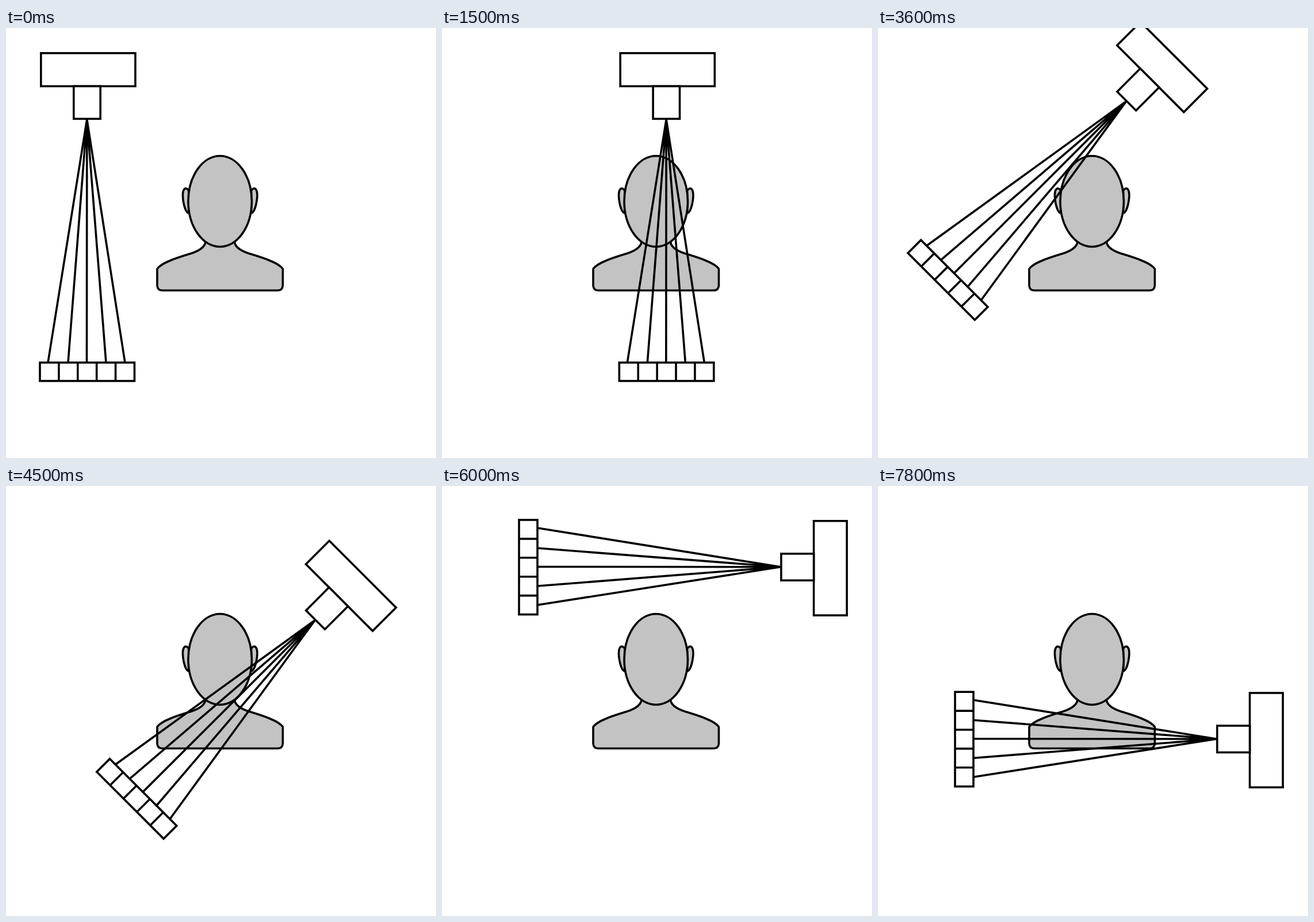
Animation of 748x748 px, one loop 8000 ms. Source, as an HTML page:

```html
<!DOCTYPE html>
<html lang="en">
<head>
<meta charset="utf-8">
<title>Scanner</title>
<style>
  html, body { margin: 0; width: 100%; height: 100%; overflow: hidden; background: #fff; }
  svg { display: block; width: 100%; height: 100%; fill: #fff; stroke: #000; stroke-width: 3.6; }
  #body { fill: #c3c3c3; }
</style>
</head>
<body>
<svg viewBox="0 0 748 748">
  <g id="body" stroke-linejoin="round">
    <path d="M347 372 C346 381 335 388 321 392.500 C300 399 270 408 263 419 V448 Q263.500 456.500 272 456.500
             H472.500 Q481 456.500 481.500 448 V419 C474.500 408 444.500 399 423.500 392.500 C409.500 388 398.500 381 397.500 372 Z"/>
    <path id="ear" d="M318 283 C313 275.500 307 279 307.500 293 C308.500 308 313 322 318 322 Z"/>
    <use href="#ear" transform="translate(744.5 0) scale(-1 1)"/>
    <ellipse cx="372.250" cy="301.500" rx="55.250" ry="79"/>
  </g>
  <g id="scanner">
    <rect x="60.800" y="43.700" width="164.200" height="57.600"/>
    <rect x="117.800" y="101.300" width="46.400" height="56.700"/>
    <path id="rays"/>
    <rect x="59" y="582" width="164.500" height="32"/>
    <path id="cells"/>
  </g>
</svg>
<script>
  const STEP = 300, LOOP = 8000, PASS = 10, SHIFT = 748 / 15;
  const get = id => document.getElementById(id);

  get('rays').setAttribute('d',
    [73, 108, 140.5, 174, 207].map(x => `M140.800 159L${x} 582`).join(''));
  get('cells').setAttribute('d',
    [1, 2, 3, 4].map(i => `M${59 + i * 32.9} 582v32`).join(''));

  // Each pass slides across in ten steps, then the gantry turns 45 degrees.
  function draw(now) {
    const step = Math.floor((now % LOOP) / STEP);
    const angle = 45 * Math.floor(step / PASS);
    const x = SHIFT * (step % PASS);
    get('scanner').setAttribute('transform', `rotate(${angle} 374 374) translate(${x} 0)`);
  }

  const start = performance.now();
  function tick() {
    draw(performance.now() - start);
    requestAnimationFrame(tick);
  }
  tick();
</script>
</body>
</html>
```
